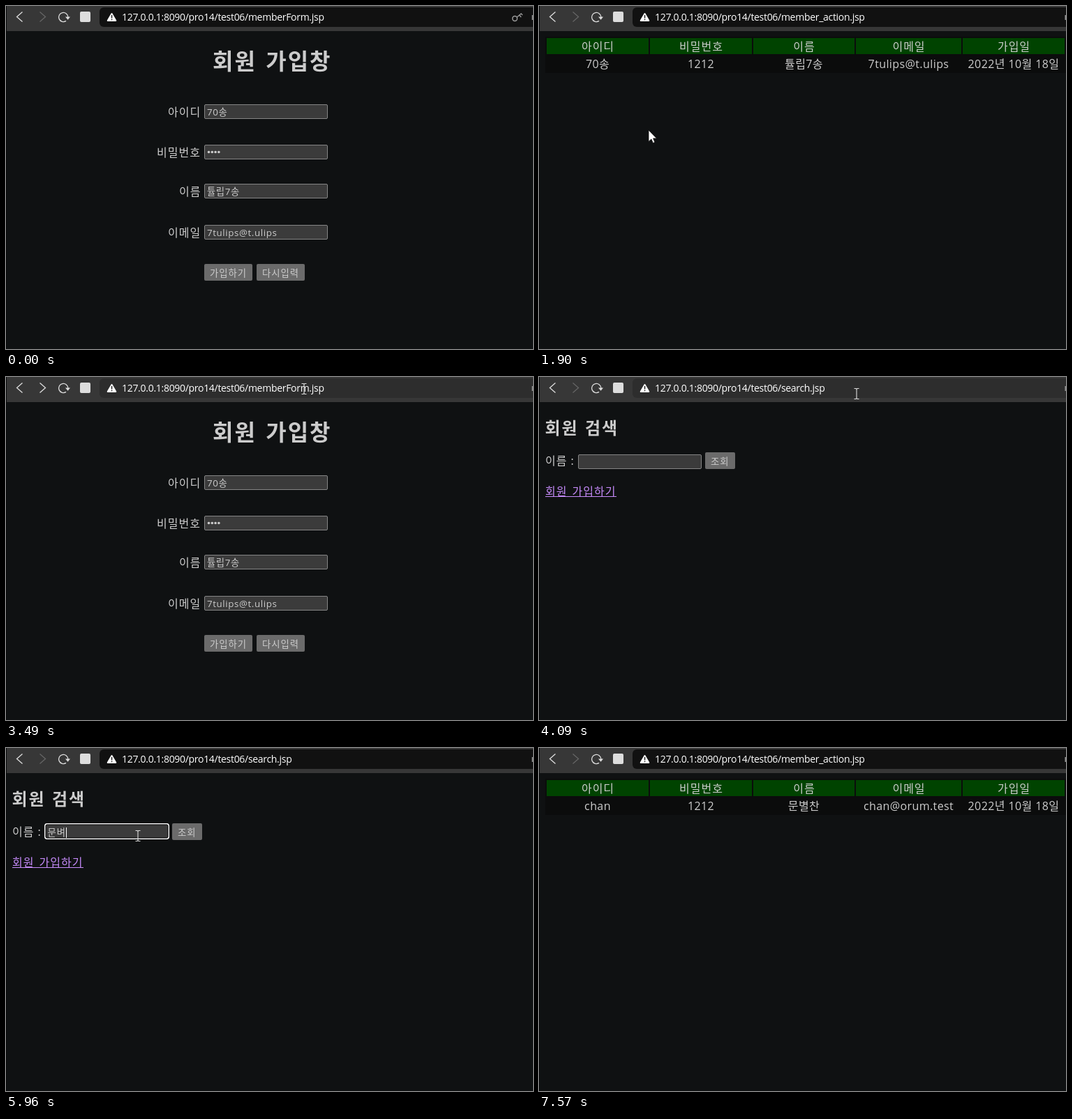
Animation of 755x492 px, one loop 7.7 s. Source, as an HTML page:

```html
<!DOCTYPE html>
<html lang="ko">
<head>
<meta charset="utf-8">
<title>회원 가입과 검색</title>
<style>
html, body { margin: 0; width: 100%; height: 100%; overflow: hidden; background: #0f1112; }
svg { display: block; width: 755px; height: 492px; }
text { font: 16px "Open Sans", "Noto Sans CJK KR", sans-serif; fill: #ccc; white-space: pre; }
.ko { letter-spacing: 1px; }
.h1 { font-size: 32px; font-weight: 700; letter-spacing: 2px; word-spacing: 3px; }
.h2 { font-size: 24px; font-weight: 700; letter-spacing: 1.9px; word-spacing: 1.5px; }
.btn { font-size: 13.33px; letter-spacing: 1px; }
.val { font-size: 13.33px; letter-spacing: .6px; }
.url { font-size: 14px; letter-spacing: -.3px; fill: #fff; }
.cell { text-anchor: middle; letter-spacing: .4px; }
.head { text-anchor: middle; letter-spacing: 1px; }
.link { fill: #c58af9; letter-spacing: 1px; word-spacing: 2px; }
.line { fill: none; stroke: #ddd; stroke-width: 1.3; }
</style>
</head>
<body>
<svg id="stage" viewBox="0 0 755 492"></svg>
<script>
const LOOP = 7700;
const rect = (x, y, w, h, fill, more = '') =>
  `<rect x="${x}" y="${y}" width="${w}" height="${h}" fill="${fill}" ${more}/>`;
const text = (x, y, cls, s, more = '') => `<text x="${x}" y="${y}" class="${cls}" ${more}>${s}</text>`;
const path = (d, more = 'class="line"') => `<path d="${d}" ${more}/>`;
const group = (id, body) => `<g id="${id}">${body}</g>`;
const field = (x, y) => rect(x + .5, y + .5, 176, 20, '#3b3b3b', 'stroke="#858585" rx="1.5"');
const button = (x, y, w, label, id) =>
  rect(x, y, w, 24, '#6b6b6b', `rx="2" id="${id}"`) + text(x + 8, y + 18, 'btn', label);

const toolbar =
  rect(0, 0, 755, 36, '#373737') + rect(0, 0, 1, 492, '#08090a') +
  rect(134, 2, 640, 28, '#111', 'rx="6" id="bar"') +
  rect(9, 4, 24, 24, '#555', 'rx="4" id="backHover"') +
  path('M23.5 8.5L15.5 15.5L23.5 22.5') +
  path('M48.5 8.5L56.5 15.5L48.5 22.5', 'class="line" id="forward"') +
  group('reload', path('M86 21.4A6.6 6.6 0 1 1 88.8 16') + path('M85 15.5H92L88.6 19.8Z', 'fill="#ddd"')) +
  group('stop', path('M77.5 10.5L88 21M88 10.5L77.5 21')) +
  rect(106, 8, 15, 15, '#ddd', 'rx="2"') +
  path('M151.5 11L157.3 21H145.7Z', 'fill="#fff" stroke="#fff" stroke-width="2" stroke-linejoin="round"') +
  rect(150.8, 13, 1.5, 4.5, '#222') + rect(150.8, 18.7, 1.5, 1.6, '#222') +
  text(166, 21, 'url', '', 'id="url"') +
  group('key', path('M732 16L738.5 10.5M735.5 13L738 16M738 11L740 13', 'fill="none" stroke="#999" stroke-width="1.4"') +
    '<circle cx="729" cy="18" r="3.4" fill="none" stroke="#999" stroke-width="1.5"/>') +
  rect(753.5, 13, 2, 7, '#999');

const rows = [[232, 141, '아이디', '70송'], [216, 199, '비밀번호', ''], [248, 255, '이름', '튤립7송'], [232, 314, '이메일', '7tulips@t.ulips']];
const dots = [0, 1, 2, 3].map(i => `<circle cx="${290.5 + i * 4.8}" cy="209.5" r="1.8" fill="#ccc"/>`).join('');
const form = text(296, 91, 'h1', '회원 가입창') +
  rows.map(([x, y, label, value]) => text(x, y + 17, 'ko', label) + field(284, y) + text(288, y + 16, 'val', value)).join('') +
  dots + button(284, 370, 69, '가입하기', 'join') + button(359, 370, 69, '다시입력', 'reset');

const search = text(8.5, 82, 'h2', '회원 검색') + text(9, 126, 'ko', '이름 :') +
  group('box', field(56, 111) +
    group('focus', rect(55.8, 110.8, 177.4, 21.4, '#3b3b3b', 'stroke="#fff" stroke-width="1.6" rx="3"') +
      rect(57.1, 112.1, 174.8, 18.8, 'none', 'stroke="#111" rx="1.5"'))) +
  text(59.5, 125.5, 'btn', '', 'id="typed"') + rect(60, 114, 1, 15, '#fff', 'id="caret"') +
  button(238, 108, 43, '조회', 'find') +
  text(9, 170, 'link', '회원 가입하기') + rect(9, 171, 102, 1, '#c58af9');

const cols = [[11, 146, '아이디'], [159, 146, '비밀번호'], [307, 145, '이름'], [454, 151, '이메일'], [607, 146, '가입일']];
const list = rect(9, 44, 746, 52, '#0b0c0c') +
  cols.map(([x, w, label], i) => rect(x, 46, w, 23, '#004300') + text(x + w / 2 + .5, 64, 'head', label) +
    text(x + w / 2, 89, 'cell', '', `id="cell${i}"`)).join('');
const members = [
  ['70송', '1212', '튤립7송', '7tulips@t.ulips', '2022년 10월 18일'],
  ['chan', '1212', '문별찬', 'chan@orum.test', '2022년 10월 18일']
];

const pointer =
  group('arrow', path('M0 0V16.5L3.9 12.9L6.4 18.6L9 17.4L6.6 11.9H11.5Z', 'fill="#fff" stroke="#111" stroke-width=".8"')) +
  group('beam', path('M-3.5 -7.5H-1L0 -6.5L1 -7.5H3.5M0 -6.5V6.5M-3.5 7.5H-1L0 6.5L1 7.5H3.5', 'fill="none" stroke="#ddd" stroke-width="1.1"'));

const stage = document.getElementById('stage');
stage.innerHTML = rect(0, 0, 755, 492, '#0f1112') + group('form', form) + group('search', search) +
  group('list', list) + toolbar + group('pointer', pointer);

const $ = id => document.getElementById(id);
const show = (id, on) => $(id).setAttribute('display', on ? 'inline' : 'none');
const paint = (id, fill) => $(id).setAttribute('fill', fill);
const put = (id, s) => { if ($(id).textContent !== s) $(id).textContent = s; };
const place = (id, x, y) => $(id).setAttribute('transform', `translate(${x} ${y})`);
const within = (t, a, b) => t >= a && t < b;
const latest = (table, t) => table.filter(row => row[0] <= t).pop();

const pages = [[0, 'form', 'memberForm'], [1160, 'list', 'member_action'], [2250, 'form', 'memberForm'],
  [4030, 'search', 'search'], [6650, 'list', 'member_action']];

// start, last step, steps, x, y, shape
const moves = [
  [200, 630, 7, 340, 392, 'arrow'], [1630, 2050, 7, 20, 17, 'arrow'],
  [2600, 2600, 1, 50, 40, 'arrow'], [2680, 2680, 1, 107, 85, 'arrow'], [2750, 2750, 1, 270, 40, 'arrow'],
  [2810, 2810, 1, 390, 13, 'beam'], [3140, 3210, 2, 451, 24, 'beam'], [3280, 3350, 2, 413, 14, 'beam'],
  [3490, 3690, 3, 455, 24, 'beam'], [4620, 4900, 5, 200, 136, 'arrow'], [4970, 5100, 2, 189, 126, 'beam'],
  [6580, 6580, 1, 188, 125, 'arrow']
];
const typing = ['ㅁ', '무', '문', '문ㅂ', '문벼', '문별', '문별ㅊ', '문별차', '문별찬'];

function pointerAt(t) {
  let x = 516, y = 500, shape = 'arrow';
  for (const [start, end, n, tx, ty, kind] of moves) {
    if (t < start) break;
    const gap = n > 1 ? (end - start) / (n - 1) : 1;
    const part = Math.min(n, Math.floor((t - start) / gap + 1e-6) + 1) / n;
    x += (tx - x) * part;
    y += (ty - y) * part;
    shape = kind;
  }
  return { x, y, shape };
}

function draw(t) {
  const [since, page, file] = latest(pages, t);
  for (const id of ['form', 'search', 'list']) show(id, id === page);
  put('url', `127.0.0.1:8090/pro14/test06/${file}.jsp`);
  members[since > 5000 ? 1 : 0].forEach((s, i) => put('cell' + i, s));

  const loading = within(t, 830, 1160) || within(t, 6580, 6650);
  show('stop', loading);
  show('reload', !loading);
  show('key', t < 1160);
  show('backHover', within(t, 2040, 2750));
  $('forward').style.stroke = within(t, 2250, 4030) ? '#ddd' : '#666';
  paint('bar', within(t, 2810, 4690) ? '#2d2d2d' : '#111');
  paint('join', within(t, 560, 1160) ? '#7a7a7a' : '#6b6b6b');

  // Hangul in the field lifts its box by two pixels.
  const count = t < 5560 ? 0 : Math.min(typing.length, Math.floor((t - 5560) / 93.75) + 1);
  const typed = count ? typing[count - 1] : '';
  put('typed', typed);
  place('box', 0, typed ? -2 : 0);
  show('focus', t >= 5100);
  show('caret', t >= 5300);
  $('caret').setAttribute('x', typed ? Math.round(59.5 + typed.length * 13.3) : 60);

  const p = pointerAt(t);
  show('pointer', within(t, 200, 7440));
  show('arrow', p.shape === 'arrow');
  show('beam', p.shape === 'beam');
  place('pointer', Math.round(p.x), Math.round(p.y));
}

const begin = performance.now();
function tick() {
  draw((performance.now() - begin) % LOOP);
  requestAnimationFrame(tick);
}
tick();
</script>
</body>
</html>
```
